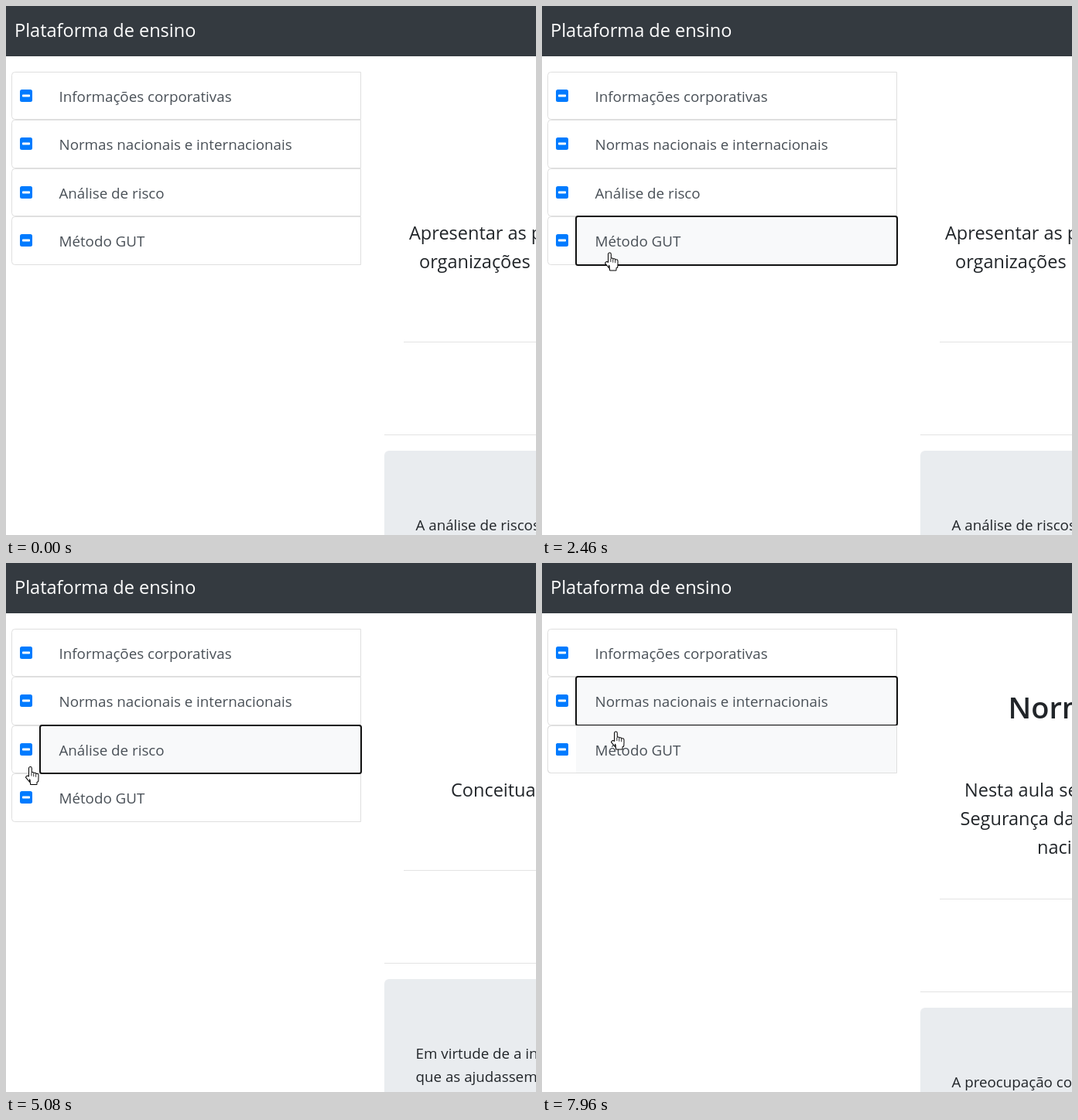
These frames come from a looping animation (685x684 px, 8 s). An HTML page with a canvas:

```html
<!DOCTYPE html>
<html lang="pt">
<head>
<meta charset="utf-8">
<title>Plataforma de ensino</title>
<style>
html, body { margin: 0; width: 100%; height: 100%; overflow: hidden; background: #fff; }
canvas { display: block; }
</style>
</head>
<body>
<canvas id="stage" width="685" height="684"></canvas>
<script>
const ctx = document.getElementById('stage').getContext('2d');
const LOOP = 8000;
const FONT = '"Open Sans", "Noto Sans", sans-serif';
const INK = '#212529';
const LINE = '#dfdfdf';
const PITCH = 62.4;
const LOAD = 160; // delay between a click and its page

// cursor moves: start, duration, end point
const ENTRY = [526, 635];
const MOVES = [
  [320, 780, 194, 224], [1130, 290, 145, 237], [1420, 410, 63, 301],
  [2160, 300, 81, 318.5], [2460, 390, 80, 247],
  [3870, 240, 66, 268], [4110, 560, 32, 300],
  [4980, 100, 25, 263], [5080, 690, 21, 238],
  [6350, 430, 146, 231], [7070, 650, 92, 187], [7860, 100, 89, 217.5]
];

// clicks: time, focused row, page
const CLICKS = [
  [0, -1, 'method'], [1940, 3, 'method'], [3010, 2, 'risk'],
  [5720, -1, 'home'], [6600, 2, 'method'], [7480, 1, 'rules']
];

const PAGES = {
  method: {
    lead: [['Apresentar as principais', 521], ['organizações', 534]],
    body: ['A análise de riscos é']
  },
  risk: {
    lead: [['Conceituar a análise', 575]],
    body: ['Em virtude de a informação', 'que as ajudassem a']
  },
  rules: {
    title: 'Normas nacionais',
    lead: [['Nesta aula serão', 546], ['Segurança da Informação', 540.5], ['nacionais', 640]],
    body: ['A preocupação com']
  }
};

const rowTop = i => Math.round(85 + PITCH * i);
const rowMid = i => Math.round(116 + PITCH * i);
const ease = u => u * u * (3 - 2 * u);
const stateAt = t => CLICKS.filter(c => c[0] <= Math.max(0, t)).pop();

function cursorAt(t) {
  if (t < MOVES[0][0]) return null;
  let [x, y] = ENTRY;
  for (const [start, span, endX, endY] of MOVES) {
    const k = ease(Math.min(1, Math.max(0, (t - start) / span)));
    x += (endX - x) * k;
    y += (endY - y) * k;
  }
  return { x, y, tipX: x + 6, tipY: y };
}

function text(str, x, y, size, color, weight = 400) {
  ctx.font = `${weight} ${size}px ${FONT}`;
  ctx.fillStyle = color;
  ctx.fillText(str, x, y);
}

function fill(color, x, y, w, h, r = 0) {
  ctx.fillStyle = color;
  ctx.beginPath();
  ctx.roundRect(x, y, w, h, r);
  ctx.fill();
}

function outline(color, width, x, y, w, h, r) {
  ctx.strokeStyle = color;
  ctx.lineWidth = width;
  ctx.beginPath();
  ctx.roundRect(x, y, w, h, r);
  ctx.stroke();
}

function drawRow(i, label, lit, dark) {
  const top = rowTop(i), height = rowTop(i + 1) - top, mid = rowMid(i);
  if (lit) fill('#f8f9fa', 44, top, 415, height);
  outline(LINE, 1, 7.5, top + 0.5, 451, height - 1, [4, 0, 0, 4]);
  fill(dark ? '#0056b3' : '#007bff', 18, mid - 8, 16, 16, 2.5);
  fill('#fff', 21, mid - 1.5, 10, 3, 0.7);
  text(label, 68.5, mid + 8, 18.75, '#495057');
}

function drawFocus(i, alpha) {
  ctx.globalAlpha = alpha;
  outline('#101010', 2, 44, rowTop(i), 415, rowTop(i + 1) - rowTop(i), 2.5);
  ctx.globalAlpha = 1;
}

function drawPage(name) {
  if (name === 'home') {
    fill('#e9ecef', 489, 85, 210, 355, 6);
    return;
  }
  const { title, lead, body } = PAGES[name];
  const gap = 37.2;
  const end = 434 - (lead.length === 1 ? 37 : 0);
  if (title) text(title, 602.5, 201, 38, INK, 600);
  lead.forEach(([str, x], i) => text(str, x, 302 + gap * i, 23.5, INK));
  fill('#e3e3e3', 514, end, 200, 1);
  fill('#e3e3e3', 489, end + 120, 200, 1);
  fill('#e9ecef', 489, end + 141, 210, 200, 6);
  body.forEach((str, i) => text(str, 529.5, end + 244 + 30 * i, 18.75, INK));
}

function handShape() {
  const shape = new Path2D();
  for (let i = 0; i < 4; i++) {
    const top = i ? 7 + i * 0.9 : 1;
    shape.roundRect(5 + 2.9 * i, top, 2.8, 17 - top, 1.4);
  }
  shape.roundRect(5, 11, 11.4, 9, 2);
  shape.rect(7, 17, 7.5, 6);
  shape.addPath(new Path2D('M6 14L2.5 12.5 1 14 7 21Z'));
  return shape;
}

const HAND = handShape();
const ARROW = new Path2D('M1 1V17L5 13.5 7.5 19 9.3 18 7 12.5H12Z');

function drawCursor(cur, hand) {
  const shape = hand ? HAND : ARROW;
  ctx.save();
  ctx.translate(cur.x, cur.y);
  ctx.strokeStyle = '#000';
  ctx.lineWidth = 2;
  ctx.lineJoin = 'round';
  ctx.stroke(shape);
  ctx.fillStyle = '#fff';
  ctx.fill(shape);
  for (let i = 1; hand && i < 4; i++) fill('#000', 4.6 + 2.9 * i, 8 + i * 0.6, 0.8, 4);
  ctx.restore();
}

function draw(t) {
  const [clicked, focus] = stateAt(t);
  const page = stateAt(t - LOAD)[2];
  const rows = ['Informações corporativas', 'Normas nacionais e internacionais'];
  if (t < CLICKS[3][0] + LOAD) rows.push('Análise de risco');
  rows.push('Método GUT');

  const cur = cursorAt(t);
  let over = -1;
  if (cur && cur.tipX < 459) {
    over = rows.findIndex((_, i) => cur.tipY >= rowTop(i) && cur.tipY < rowTop(i + 1));
  }
  const onCell = over >= 0 && cur.tipX < 43;
  const hover = onCell ? -1 : over;
  const dark = onCell && Math.abs(cur.tipY - rowMid(over)) <= 12;
  const row = i => drawRow(i, rows[i], i === hover || i === focus, dark && i === over);

  fill('#fff', 0, 0, 685, 684);
  fill('#343a40', 0, 0, 685, 65);
  text('Plataforma de ensino', 11, 40, 23.5, '#fff');
  drawPage(page);

  rows.forEach((_, i) => row(i));
  if (focus >= 0) drawFocus(focus, Math.min(1, (t - clicked + 17) / 50));
  if (hover >= 0 && hover !== focus) row(hover); // a hovered row lies above its neighbours
  if (cur) drawCursor(cur, over >= 0);
}

const start = performance.now();
function tick() {
  draw((performance.now() - start) % LOOP);
  requestAnimationFrame(tick);
}
tick();
</script>
</body>
</html>
```
